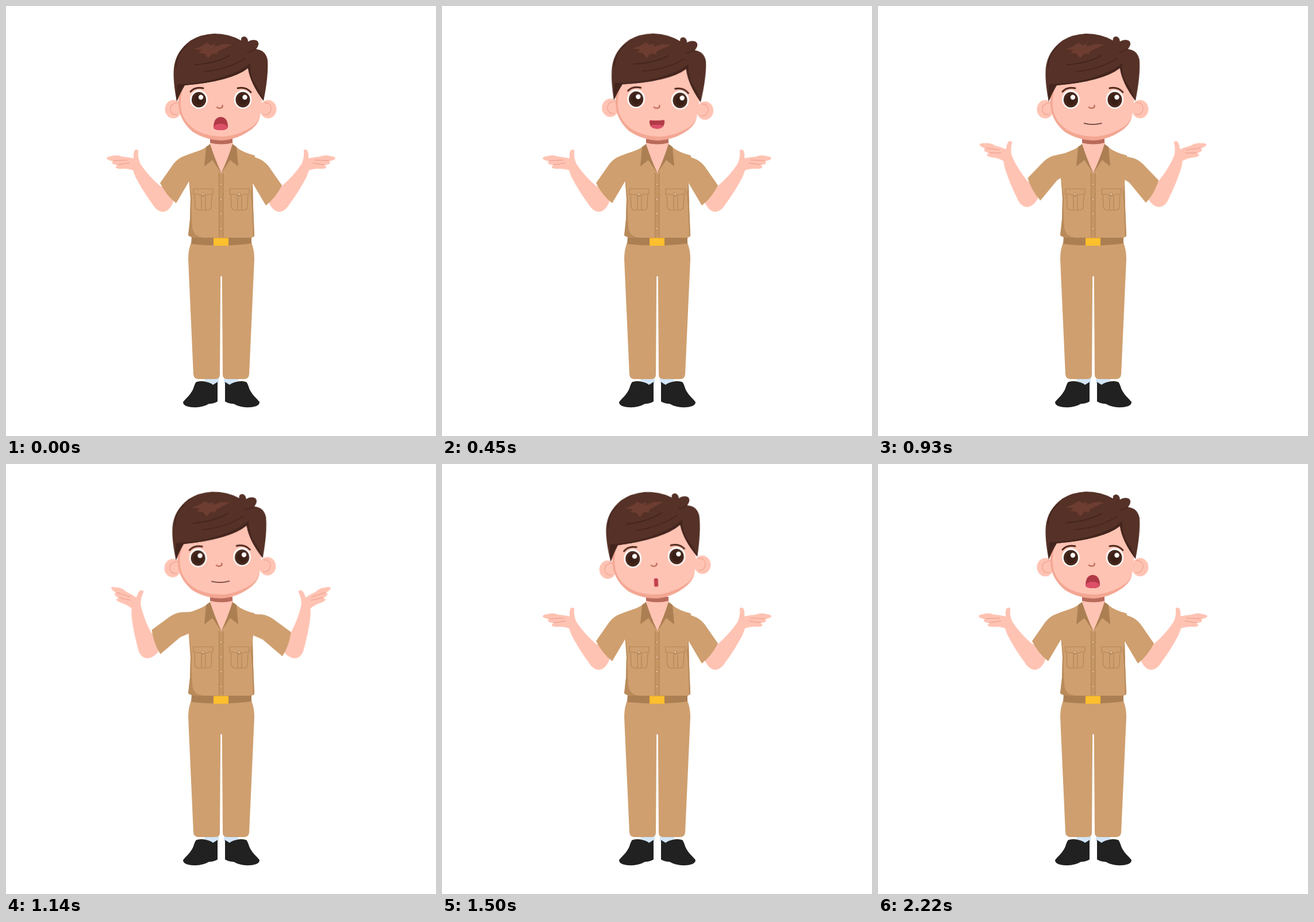
These frames come from a looping animation (748x748 px, 2.25 s). An HTML page without scripts:

```html
<!DOCTYPE html>
<html lang="en">
<head>
<meta charset="utf-8">
<title>Talking man</title>
<style>
  html, body { margin: 0; width: 100%; height: 100%; overflow: hidden; background: #fff; }
  svg { display: block; width: 100vw; height: 100vh; }

  :root { --skin: #ffc3b3; --shade: #f3a793; --khaki: #cf9f6f; --seam: #b38558; --hair: #553127; }
  .skin { fill: var(--skin); }
  .shade { fill: var(--shade); }
  .khaki { fill: var(--khaki); }
  .dark-khaki { fill: #ac7f53; }
  .hair { fill: var(--hair); }
  .shoe { fill: #212121; }
  .sock { fill: #d3e5f7; }
  .lips { fill: #b13a47; }
  .tongue { fill: #dc5068; }
  .line { fill: none; stroke-linecap: round; stroke-linejoin: round; }
  .seam { stroke: var(--seam); stroke-width: 1.2; }
  .crease { stroke: #f0a594; stroke-width: 1.3; }
  .strand { stroke: #40231c; stroke-width: 1.5; }
  .brow { stroke: #50291e; stroke-width: 3; }

  .head, .arm, .forearm, .mouth { animation: 2.25s linear infinite; }
  .head { transform-origin: 372px 235px; animation-name: sway; }
  .arm { transform-origin: 319px 255px; animation-name: lift; }
  .forearm { transform-origin: 268px 335px; animation-name: bend; }
  .arm, .forearm { animation-timing-function: ease-in-out; }
  .mouth { visibility: hidden; animation-timing-function: step-end; }
  .wide { animation-name: wide; }
  .oval { animation-name: oval; }
  .grin { animation-name: grin; }
  .closed { animation-name: closed; }
  .narrow { animation-name: narrow; }
  .small { animation-name: small; }

  @keyframes sway {
    0%, 100% { transform: rotate(0deg); }
    9.33% { transform: rotate(1.1deg); animation-timing-function: ease-out; }
    20% { transform: rotate(1.7deg); animation-timing-function: ease-in; }
    30.67% { transform: rotate(1.1deg); }
    50.67% { transform: rotate(-1.1deg); animation-timing-function: cubic-bezier(.4, .4, .7, 1); }
    66.67% { transform: rotate(-3deg); animation-timing-function: cubic-bezier(.3, 0, .6, .6); }
    81.33% { transform: rotate(-1.3deg); }
    98.67% { transform: rotate(-.05deg); }
  }
  @keyframes lift {
    0%, 33.3%, 66.67%, 100% { transform: rotate(0deg); }
    50%, 51.3% { transform: rotate(19deg); }
  }
  @keyframes bend {
    0%, 33.3%, 66.67%, 100% { transform: rotate(0deg); }
    50%, 51.3% { transform: rotate(2deg); }
  }
  @keyframes wide { 0%, 90.67%, 100% { visibility: visible; } 5.33% { visibility: hidden; } }
  @keyframes oval { 5.33% { visibility: visible; } 0%, 20% { visibility: hidden; } }
  @keyframes grin { 20% { visibility: visible; } 0%, 40% { visibility: hidden; } }
  @keyframes closed { 40% { visibility: visible; } 0%, 58.67% { visibility: hidden; } }
  @keyframes narrow { 58.67% { visibility: visible; } 0%, 73.33% { visibility: hidden; } }
  @keyframes small { 73.33% { visibility: visible; } 0%, 90.67% { visibility: hidden; } }
</style>
</head>
<body>
<svg viewBox="0 0 748 748" role="img" aria-label="A man in a khaki uniform talks and lifts his hands">
  <defs>
    <g id="forearm">
      <path class="skin" d="M291 341Q284 358 272 358Q262 357 255 345Q238 322 225 297L221 286Q217 284 206 283Q193 284 191 281Q190 278 195 277Q184 276 184 272L186 270Q176 268 175 265Q175 262 184 261Q193 258 202 262Q213 263 222 265Q221 251 226 250Q231 249 230 254Q229 264 234 275Q248 296 268 313L292 320Z"/>
      <path class="line crease" d="M187 269L211 268M194 276Q204 275 214 273"/>
    </g>
    <path id="sleeve" class="khaki" d="M345 249Q322 256 310 261Q300 264 291 275L268 308Q279 330 296 343L319 304L340 285Z"/>
    <g id="pocket" class="line seam">
      <path d="M326 318H360V327Q350 327 343 331Q336 327 326 327ZM328 328L329 350Q331 355 336 355H351Q357 354 357 349L358 328M340 331V355M347 331V355"/>
      <circle cx="342.5" cy="327.5" r="2" fill="#f1d3b0"/>
    </g>
    <g id="eye">
      <ellipse cx="335.5" cy="162.5" rx="15.3" ry="16.3" fill="#fff"/>
      <ellipse cx="335.5" cy="163" rx="12.6" ry="13.6" fill="#45271c"/>
      <ellipse cx="335.5" cy="163" rx="8" ry="9" fill="#3a1f16"/>
      <circle cx="339" cy="158.8" r="4.2" fill="#fff"/>
    </g>
    <g id="leg">
      <path class="sock" d="M345 647H370V656L360 660L346 656Z"/>
      <path class="shoe" d="M331 654Q340 651 349 654Q357 656 360 659L368 654V688Q361 692 353 692Q341 699 325 698Q308 697 308 689Q311 685 317 679Q325 670 327 662Q329 656 331 654Z"/>
      <path class="khaki" d="M322 412Q317 424 317 440L326 641Q327 649 335 649H364Q372 649 372 641L373.2 471L375 469V412Z"/>
    </g>
    <path id="collar" class="dark-khaki" d="M355 240L348 245L345 279L359 268L375 291.5Q363 266 355 240Z"/>
  </defs>

  <use href="#leg"/>
  <use href="#leg" transform="matrix(-1 0 0 1 749 0)"/>
  <path class="dark-khaki" d="M323 400H427V413Q375 420 322 414Z"/>
  <rect x="361" y="403.5" width="26" height="13.5" fill="#fdbf2d"/>

  <g class="arm">
    <use class="forearm" href="#forearm"/>
    <use href="#sleeve"/>
  </g>
  <g transform="matrix(-1 0 0 1 748 0)">
    <g class="arm">
      <use class="forearm" href="#forearm"/>
      <use href="#sleeve" y="4"/>
    </g>
  </g>

  <path class="khaki" d="M349 245Q338 252 316 259L318 300L321 335L320 372L317 399Q322 403 332 403H428L432 400L430 350L429 310L433 260Q412 255 400 245Z"/>
  <path fill="#b98a5a" d="M319 300L321 335L320 372L317 399Q322 403 332 403H343Q326 401 324 385Q322 355 323 334ZM429 308L430 350L432 400L430 402L428 350L426 325Z"/>
  <path class="skin" d="M355 236H394L395 240Q387 265 375 291.5Q363 266 355 240Z"/>
  <path fill="#b96b5b" d="M355 231H394V238Q375 243 355 238Z"/>
  <use href="#collar"/>
  <use href="#collar" transform="matrix(-1 0 0 1 749 0)"/>
  <rect x="370.5" y="292" width="7.5" height="110" fill="#c69564"/>
  <path class="line seam" d="M370.5 290V402M378 290V402"/>
  <g fill="#f1d3b0" stroke="#b38558">
    <circle cx="374" cy="310" r="1.8"/>
    <circle cx="374" cy="336" r="1.8"/>
    <circle cx="374" cy="361" r="1.8"/>
    <circle cx="374" cy="387" r="1.8"/>
  </g>
  <use href="#pocket"/>
  <use href="#pocket" x="63"/>

  <g class="head">
    <ellipse class="skin" cx="291" cy="179.5" rx="14.5" ry="16"/>
    <ellipse class="skin" cx="456" cy="179.5" rx="14.5" ry="16"/>
    <path class="line crease" d="M299 168Q285 170 286 181Q288 190 298 189M449 168Q462 168 461 180Q459 190 449 189"/>
    <path class="shade" d="M304 130Q297 155 301 180Q305 202 325 219Q347 233 375 234Q405 232 429 213Q442 202 442 188L447 150L420 100Z"/>
    <path class="skin" d="M313 130Q299 160 306 186Q313 207 334 218Q355 228 381 227Q411 223 432 207Q442 198 443 184L447 150L420 100Z"/>

    <path class="hair" d="M297 166Q290 130 292 108Q295 79 321 60Q339 49 362 48Q388 48 409 60Q408 53 415 53Q421 55 421 62Q428 57 436 60Q443 65 435 75Q452 77 455 94Q457 120 448 165Q425 135 421 108Q392 131 311 138Q304 149 297 166Z"/>
    <path fill="#43251e" d="M297 166Q295 150 298 136Q350 135 395 117Q415 109 425 99Q423 112 430 130Q440 145 448 162V165Q425 135 421 108Q392 131 311 138Q304 149 297 166Z"/>
    <path fill="#6c3d30" d="M327 75L340 70L349 64L356 68L364 66L363 71L378 66L394 67L381 73L369 79L368 84L359 83L352 91L345 83L335 82L340 77Z"/>
    <path class="line strand" d="M328 102Q365 100 389 86M345 114Q390 109 416 91M296 106Q297 82 314 69M434 75Q428 79 420 80"/>

    <use href="#eye"/>
    <use href="#eye" x="76.5"/>
    <path class="line brow" d="M321 149Q329 140 343 143M403 143Q417 140 426 150"/>
    <path class="line" stroke="#c06c5a" stroke-width="2.4" d="M367 176Q370 179 375 177Q377 176 376.5 173"/>

    <g class="mouth wide">
      <path class="lips" d="M361 212Q361 193 374 193Q386 194 386 211Q384 216 374 216Q363 216 361 212Z"/>
      <path class="tongue" d="M361 210Q367 204 376 205Q383 206 386 211Q384 216 374 216Q363 216 361 212Z"/>
    </g>
    <g class="mouth oval">
      <ellipse class="lips" cx="373" cy="206" rx="8" ry="12"/>
      <ellipse class="tongue" cx="373" cy="212" rx="5.5" ry="5.5"/>
    </g>
    <g class="mouth grin">
      <path class="lips" d="M362 199Q373 200 384 198Q387 198 386 203Q385 213 373 213.5Q361 213 360 203Q359 199 362 199Z"/>
      <path class="tongue" d="M362 209Q368 205 374 207Q380 205 384 209Q380 213.5 373 213.5Q365 213 362 209Z"/>
    </g>
    <path class="mouth closed line" stroke="#5a2f28" stroke-width="1.5" d="M358.5 204Q374 208 389 204"/>
    <rect class="mouth narrow" x="370.5" y="199" width="7" height="14.5" rx="2" fill="#c23f50"/>
    <g class="mouth small">
      <ellipse class="lips" cx="373.7" cy="206" rx="6.5" ry="9"/>
      <ellipse class="tongue" cx="373.7" cy="210" rx="4.5" ry="4.5"/>
    </g>
  </g>
</svg>
</body>
</html>
```
